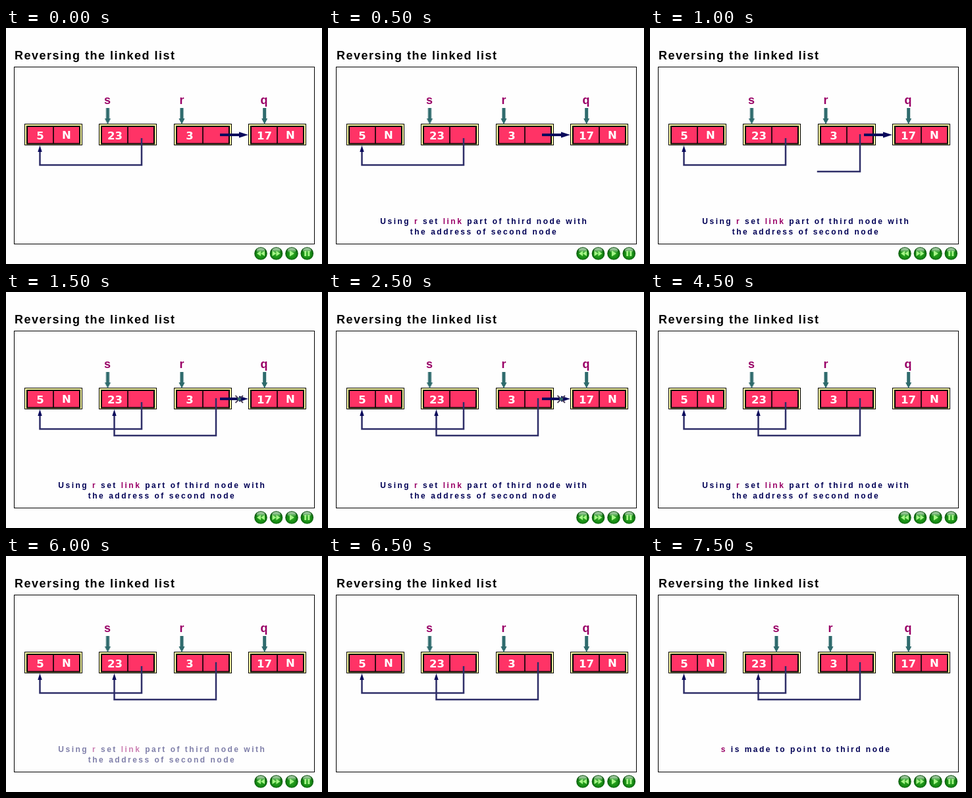
An HTML page that plays this animation: 480 px wide and 360 px high, repeating every 8 s.

```html
<!DOCTYPE html>
<html lang="en">
<head>
<meta charset="utf-8">
<title>Reversing the linked list</title>
<style>
html, body { margin: 0; width: 100%; height: 100%; overflow: hidden; background: #fefefe; }
svg { display: block; width: 480px; height: 360px; }
text { font: bold 12px "Liberation Sans", Arial, sans-serif; }
.title { font-size: 18px; letter-spacing: 1.5px; }
.value text { font: bold 16.5px "DejaVu Sans", sans-serif; fill: #fff; text-anchor: middle; }
.name { font-size: 18px; fill: #906; text-anchor: middle; }
.caption { fill: #005; letter-spacing: 2.5px; }
.caption tspan { fill: #906; }
.link { fill: none; stroke: #2e2e68; stroke-width: 2.5; }
.head { fill: #0a0a5c; }

/* every change is a hard cut on the half second */
.first, .second, .draw, .tip, .cross, .next, .s, .r, .glow {
  animation: 8s step-end infinite;
}
.first { animation-name: first; }
.second { animation-name: second; }
.draw { stroke-dasharray: 100 200; animation-name: draw; }
.tip { animation-name: tip; }
.cross { animation-name: cross; }
.next { animation-name: next; }
.s { animation-name: s; }
.r { animation-name: r; }
.glow { animation-name: glow; }
@keyframes first {
  0% { opacity: 0; }
  6.25% { opacity: 1; }
  75% { opacity: .5; }
  81.25%, 100% { opacity: 0; }
}
@keyframes second { 0% { opacity: 0; } 87.5%, 100% { opacity: 1; } }
@keyframes draw {
  0% { stroke-dashoffset: 100; opacity: 0; }
  12.5% { stroke-dashoffset: 50; opacity: 1; }
  18.75%, 100% { stroke-dashoffset: 0; opacity: 1; }
}
@keyframes tip { 0% { opacity: 0; } 18.75%, 100% { opacity: 1; } }
@keyframes cross { 0% { opacity: 0; } 18.75% { opacity: 1; } 56.25%, 100% { opacity: 0; } }
@keyframes next { 0% { opacity: 1; } 56.25%, 100% { opacity: 0; } }
@keyframes s { 0% { transform: none; } 93.75%, 100% { transform: translateX(37.5px); } }
@keyframes r { 0% { transform: none; } 93.75%, 100% { transform: translateX(7px); } }
@keyframes glow { 0% { opacity: 0; } 93.75%, 100% { opacity: 1; } }
</style>
</head>
<body>
<svg viewBox="0 0 480 360">
  <defs>
    <g id="node">
      <rect x=".5" y="146.5" width="87" height="32" fill="#ffffa8" stroke="#000"/>
      <rect x="4" y="150" width="80" height="26.5" fill="#f36" stroke="#000" stroke-width="2"/>
      <path d="M44 150v26" stroke="#000" stroke-width="1.6"/>
    </g>
    <path id="down" d="M-2.5 122h5v16h2l-4.5 9l-4.5-9h2z"/>
    <path id="up" d="M0 179l3.2 10h-6.4z"/>
    <g id="pointer">
      <use href="#down" x="1.6" fill="#5f3" class="glow"/>
      <use href="#down" fill="#2f6b6d"/>
    </g>
    <radialGradient id="ball" cx=".5" cy=".55" r=".52">
      <stop offset="0" stop-color="#2eae22"/>
      <stop offset=".65" stop-color="#168a14"/>
      <stop offset="1" stop-color="#07500a"/>
    </radialGradient>
    <linearGradient id="shine" x2="0" y2="1">
      <stop offset="0" stop-color="#fff" stop-opacity=".75"/>
      <stop offset="1" stop-color="#fff" stop-opacity="0"/>
    </linearGradient>
    <g id="button">
      <circle r="9.8" fill="url(#ball)"/>
      <ellipse cy="-4.6" rx="6.5" ry="4" fill="url(#shine)"/>
    </g>
  </defs>

  <rect width="480" height="360" fill="#fefefe"/>
  <text class="title" x="13" y="48">Reversing the linked list</text>
  <rect x="12.5" y="59.5" width="456" height="270" fill="none" stroke="#000"/>

  <use href="#node" x="28"/>
  <use href="#node" x="141"/>
  <use href="#node" x="255"/>
  <use href="#node" x="368"/>
  <g class="value">
    <text x="52" y="169.5">5</text>
    <text x="92" y="169">N</text>
    <text x="165.5" y="169.5">23</text>
    <text x="279" y="169.5">3</text>
    <text x="392.5" y="169.5">17</text>
    <text x="432" y="169">N</text>
  </g>

  <path class="link" d="M206 168V209H51.5V186"/>
  <use href="#up" x="51.5" class="head"/>
  <path class="link draw" pathLength="100" d="M319 162V219H164.5V186"/>
  <g class="tip"><use href="#up" x="164.5" class="head"/></g>

  <path class="head next" d="M325 161h29v-2.5l14 4.5l-14 4.5v-2.5h-29z"/>
  <g class="cross">
    <path d="M348.5 158l11.5 11M360 158l-11.5 11" stroke="#4a4058" stroke-width="1.8"/>
    <circle cx="354.3" cy="163.3" r="2.5" fill="#2f6b6d"/>
  </g>

  <g class="s">
    <text class="name" x="154" y="116">s</text>
    <use href="#pointer" x="154.5"/>
  </g>
  <g class="r">
    <text class="name" x="267" y="116">r</text>
    <use href="#pointer" x="267"/>
  </g>
  <text class="name" x="392" y="116">q</text>
  <use href="#pointer" x="392.7"/>

  <g class="first">
    <text class="caption" x="79.3" y="299">Using <tspan>r</tspan> set <tspan>link</tspan> part of third node with</text>
    <text class="caption" x="124.8" y="315">the address of second node</text>
  </g>
  <g class="second">
    <text class="caption" x="107.8" y="298.5"><tspan>s</tspan> is made to point to third node</text>
  </g>

  <g fill="#a4f486">
    <g transform="translate(387 344)"><use href="#button"/><path d="M0-4v8l-6-4zM6-4v8l-6-4z"/></g>
    <g transform="translate(410.5 344)"><use href="#button"/><path d="M-6-4v8l6-4zM0-4v8l6-4z"/></g>
    <g transform="translate(434 344)"><use href="#button"/><path d="M-3-4.5v9l7-4.5z"/></g>
    <g transform="translate(457.3 344)"><use href="#button"/><path d="M-4-4h2.8v8h-2.8zM1.2-4h2.8v8h-2.8z"/></g>
  </g>
</svg>
</body>
</html>
```
